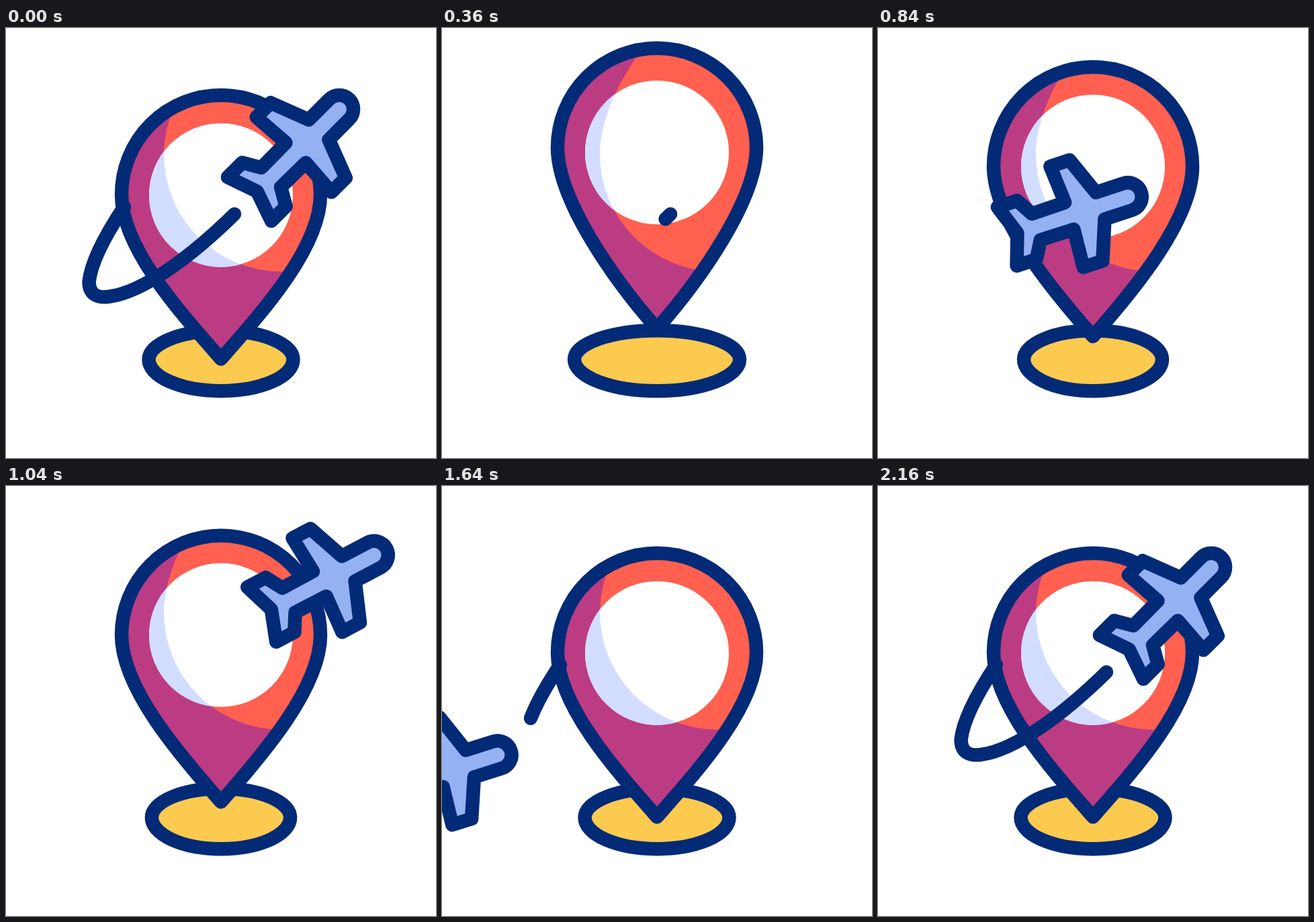
Animation of 640 by 640 pixels, one loop 2.4 s. Source, as an HTML page with a canvas:

```html
<!DOCTYPE html>
<html lang="en">
<head>
<meta charset="utf-8">
<title>Travel pin</title>
<style>
html, body { margin: 0; width: 100%; height: 100%; overflow: hidden; background: #fff; }
canvas { display: block; width: 640px; height: 640px; }
</style>
</head>
<body>
<canvas id="stage" width="640" height="640"></canvas>
<script>
const ctx = document.getElementById('stage').getContext('2d');
const LOOP = 2400, STEP = 40;
const NAVY = '#032a76', RED = '#ff6050', PURPLE = '#bc3c84',
      BLUE = '#94b1f3', PALE = '#d2ddff', YELLOW = '#fdca50';

// Smooth track through [time, value] keys, resting at both ends and at turns
function track(times, vals) {
  const n = times.length;
  const rate = i => (vals[i + 1] - vals[i]) / (times[i + 1] - times[i]);
  const slope = vals.map((_, i) => {
    if (i === 0 || i === n - 1) return 0;
    const a = rate(i - 1), b = rate(i);
    if (a * b <= 0) return 0;
    const h0 = times[i] - times[i - 1], h1 = times[i + 1] - times[i];
    return (a * h1 + b * h0) / (h0 + h1);
  });
  return t => {
    if (t <= times[0]) return vals[0];
    if (t >= times[n - 1]) return vals[n - 1];
    let i = 0;
    while (t > times[i + 1]) i++;
    const h = times[i + 1] - times[i], u = (t - times[i]) / h, w = 1 - u;
    return w * w * (1 + 2 * u) * vals[i] + u * u * (3 - 2 * u) * vals[i + 1]
      + h * u * w * (w * slope[i] - u * slope[i + 1]);
  };
}

// Pin hop: head, hole and tip move by different amounts
const hop = [0, 360, 840, 1240, 1560];
const headY = track(hop, [0, -70, -42, -12, 0]);
const holeY = track(hop, [0, -63.5, -42.5, -12, 0]);
const tipY = track(hop, [0, -45, -33.5, -11, 0]);
const baseR = track(hop, [107.5, 123, 103, 104, 107.5]);

function flight(times, x, y, deg) {
  return { from: times[0], to: times[times.length - 1],
    x: track(times, x), y: track(times, y), deg: track(times, deg) };
}
const flights = [
  flight([0, 120, 320], [428.5, 500, 800], [188.5, 116, -184], [-45, -45, -45]),
  flight([300, 440, 840, 1240, 1440], [-215, -90, 281, 645.6, 830],
    [515, 464, 281, -1, -150], [8, 1, -18.2, -37, -45]),
  flight([1520, 1640, 1840, 2160], [-180, -8.5, 238, 428.5],
    [445, 429, 324.5, 188.5], [-10, -17.5, -32, -45])
];

const trailD = 'M176 266C152 302 127 345 123.5 378C124 396 135 402 152 400C205 394 280 336 340 277';
const trail = new Path2D(trailD);
const probe = document.createElementNS('http://www.w3.org/2000/svg', 'path');
probe.setAttribute('d', trailD);
const trailLen = probe.getTotalLength();

// Edge of the shaded side; it stays put while the pin moves
const shade = new Path2D('M0 -60H345L293 38C255 92 235 145 235 188A175 174.5 0 0 0 410 362.5H640V640H0Z');

// One half of the plane from nose to tail, mirrored for the other half
const half = [[52.5, 21], [30.2, 79], [0, 79], [4, 21], [-48, 20.5], [-62.8, 46], [-93.5, 46]];
const plane = new Path2D();
plane.arc(95.5, 0, 21, -Math.PI / 2, Math.PI / 2);
half.forEach(([x, y]) => plane.lineTo(x, y));
plane.lineTo(-77.5, 0);
half.slice().reverse().forEach(([x, y]) => plane.lineTo(x, -y));
plane.closePath();

function fill(path, color) {
  ctx.fillStyle = color;
  ctx.fill(path);
}

function shaded(path, light, dark) {
  fill(path, light);
  ctx.save();
  ctx.clip(path);
  fill(shade, dark);
  ctx.restore();
}

function drawBase(t) {
  const p = new Path2D(), r = baseR(t);
  p.ellipse(320, 493.3, r, 43, 0, Math.PI, Math.PI * 2);
  p.ellipse(320, 493.3, r, 46.9, 0, 0, Math.PI);
  p.closePath();
  fill(p, YELLOW);
  ctx.stroke(p);
}

function drawPin(t) {
  const dy = headY(t), tip = tipY(t), cy = 248 + dy;
  const pin = new Path2D();
  pin.arc(320, cy, 148, Math.PI, 0);
  pin.bezierCurveTo(468, 326 + dy, 384, 420 + tip, 320, 492.5 + tip);
  pin.bezierCurveTo(256, 420 + tip, 172, 326 + dy, 172, cy);
  pin.closePath();
  shaded(pin, RED, PURPLE);
  const hole = new Path2D();
  hole.arc(320, 248.7 + holeY(t), 107, 0, Math.PI * 2);
  shaded(hole, '#fff', PALE);
  ctx.stroke(pin);
}

function drawTrail(t) {
  const a = t < 400 ? Math.min(1, t / 370) : 0;
  const b = t < 400 ? 1 : Math.min(1, (t - 1484) / 676);
  if (b <= a) return;
  ctx.save();
  ctx.setLineDash([(b - a) * trailLen + (b === 1 ? 2 : 0), 2000]);
  ctx.lineDashOffset = -a * trailLen;
  ctx.stroke(trail);
  ctx.restore();
}

function drawPlane(t) {
  for (const f of flights) {
    const last = f === flights[flights.length - 1];
    if (t < f.from || (t > f.to && !last)) continue;
    ctx.save();
    ctx.translate(f.x(t), f.y(t));
    ctx.rotate(f.deg(t) * Math.PI / 180);
    fill(plane, BLUE);
    ctx.stroke(plane);
    ctx.restore();
  }
}

function draw(t) {
  ctx.fillStyle = '#fff';
  ctx.fillRect(0, 0, 640, 640);
  ctx.strokeStyle = NAVY;
  ctx.lineWidth = 20.5;
  ctx.lineCap = ctx.lineJoin = 'round';
  drawBase(t);
  drawPin(t);
  drawTrail(t);
  drawPlane(t);
}

const start = performance.now();
function tick() {
  const t = (performance.now() - start) % LOOP;
  draw(Math.floor(t / STEP) * STEP);
  requestAnimationFrame(tick);
}
tick();
</script>
</body>
</html>
```
